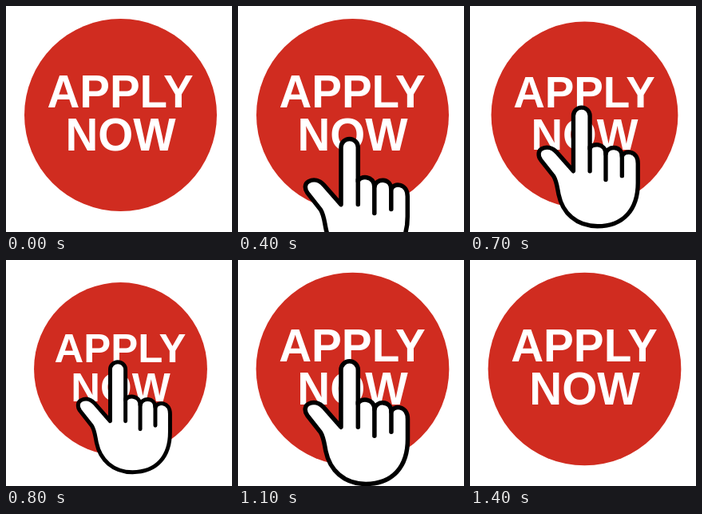
An HTML page with a canvas that plays this animation: 283 px wide and 283 px high, repeating every 1500 ms.

```html
<!DOCTYPE html>
<html lang="en">
<head>
<meta charset="utf-8">
<title>Apply now</title>
<style>
  html, body { margin: 0; width: 100%; height: 100%; overflow: hidden; background: #fff; }
  canvas { display: block; width: 283px; height: 283px; }
</style>
</head>
<body>
<canvas id="stage"></canvas>
<script>
const SIZE = 283, LOOP = 1500, STEP = 100;
const CX = 143.5, CY = 136.5, RADIUS = 120.5;
const TRAVEL = 198;

const canvas = document.getElementById('stage');
const ctx = canvas.getContext('2d');
const dpr = window.devicePixelRatio || 1;
canvas.width = canvas.height = Math.round(SIZE * dpr);

const outline = new Path2D(`
  M129 209 V137.5 A10.65 10.65 0 0 1 150.3 137.5 V180
  C152 172.5 170.8 172 170.8 187
  C172 176 191.8 175 191.8 190
  C194 181.5 212.3 181.5 212.3 199
  V224 C212.3 258 194 280 160 280
  C133 280 115 263 110 239 C108 229 107.5 222 103.5 215.5
  L87 194.5 C83 189 83.5 182.5 88.5 180
  C95 176.7 102 178.5 107.5 184.5 Z`);
const creases = new Path2D('M150.3 178 V209 M170.8 185 V220 M191.8 188 V215');

const clamp = v => Math.min(1, Math.max(0, v));
const progress = (t, from, to) => clamp((t - from) / (to - from));
const easeIn = p => p * p * p;

function pressScale(t) {
  return t < 800
    ? 1 - 0.1 * easeIn(progress(t, 500, 800))
    : 0.9 + 0.103 * easeIn(progress(t, 800, 1100));
}

function handOffset(t) {
  return TRAVEL * (1 - progress(t, 0, 500) + progress(t, 1100, 1400));
}

function drawButton() {
  ctx.fillStyle = '#d02c20';
  ctx.beginPath();
  ctx.arc(CX, CY, RADIUS, 0, Math.PI * 2);
  ctx.fill();
  ctx.fillStyle = '#fff';
  ctx.font = 'bold 56.5px "Liberation Sans", Arial, sans-serif';
  ctx.textAlign = 'center';
  ctx.fillText('APPLY', 143, 127);
  ctx.fillText('NOW', 143.5, 181);
}

function drawHand(dy) {
  ctx.translate(0, dy);
  ctx.fillStyle = '#fff';
  ctx.strokeStyle = '#000';
  ctx.lineWidth = 5.5;
  ctx.lineCap = ctx.lineJoin = 'round';
  ctx.fill(outline);
  ctx.stroke(outline);
  ctx.stroke(creases);
}

function draw(now) {
  const t = Math.floor((now % LOOP) / STEP) * STEP;
  const s = pressScale(t);
  ctx.setTransform(dpr, 0, 0, dpr, 0, 0);
  ctx.fillStyle = '#fff';
  ctx.fillRect(0, 0, SIZE, SIZE);
  ctx.translate(CX, CY);
  ctx.scale(s, s);
  ctx.translate(-CX, -CY);
  drawButton();
  drawHand(handOffset(t));
}

const start = performance.now();
function tick() {
  draw(performance.now() - start);
  requestAnimationFrame(tick);
}
tick();
</script>
</body>
</html>
```
